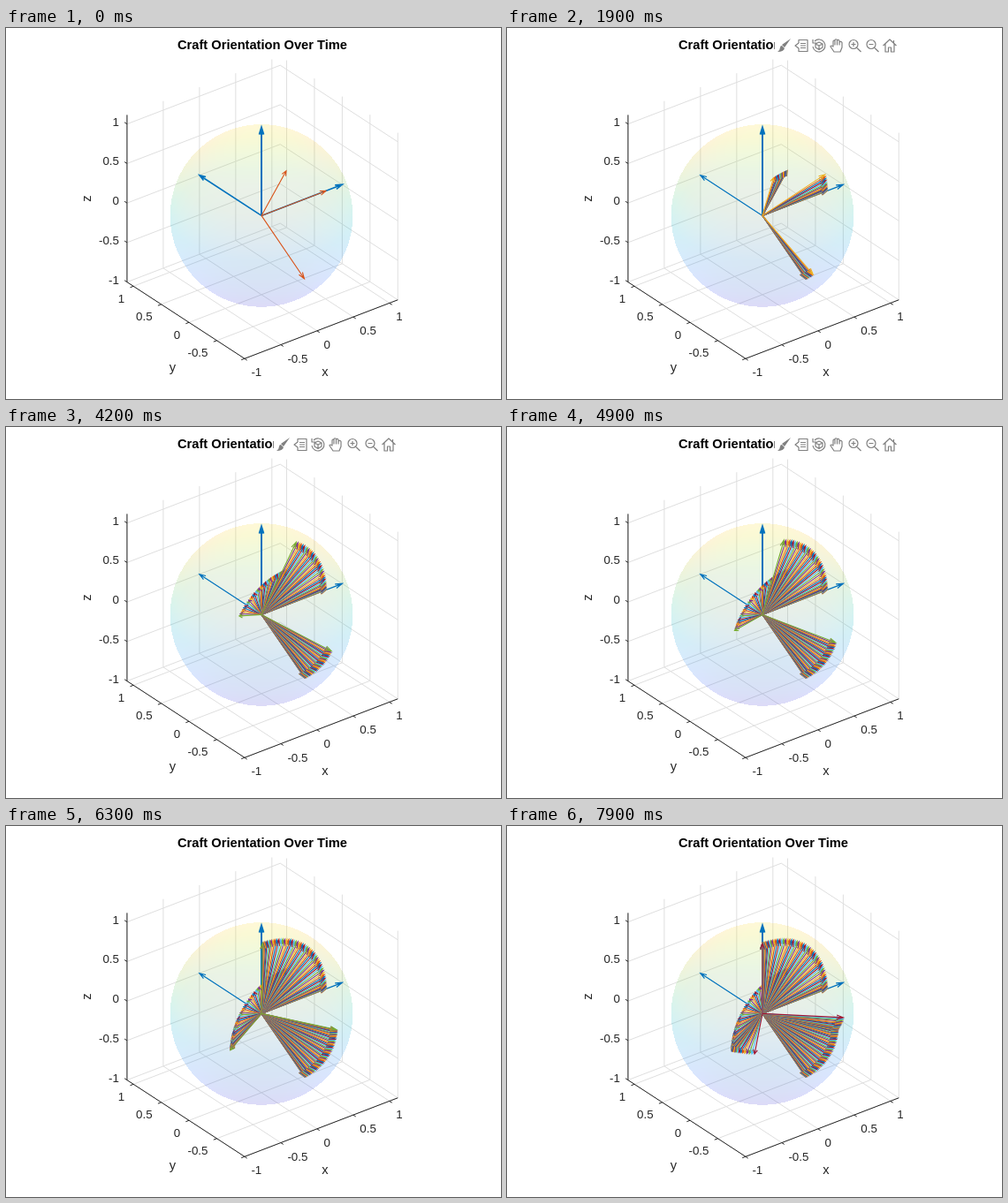
Animation of 560x420 px, one loop 8000 ms. Source, as an HTML page with a canvas:

```html
<!DOCTYPE html>
<html lang="en">
<head>
<meta charset="utf-8">
<title>Craft orientation</title>
<style>
  html, body { margin: 0; width: 100%; height: 100%; overflow: hidden; background: #fff; }
  canvas { display: block; }
</style>
</head>
<body>
<canvas id="stage" width="560" height="420"></canvas>
<script>
const W = 560, H = 420, LOOP = 8000;
const ctx = document.getElementById('stage').getContext('2d');
const FONT = '"Liberation Sans", Arial, sans-serif';
const ORIGIN = [289, 212.4], UNIT = 103.3;
const LOW = -1, HIGH = 1.115, BODY = 0.89;
const TICKS = [-1, -0.5, 0, 0.5, 1];
const COLORS = ['#0072bd', '#d95319', '#edb120', '#7e2f8e', '#77ac30', '#4dbeee', '#a2142f'];
const PARULA = [[62, 38, 168], [71, 82, 244], [46, 135, 247], [29, 167, 224], [18, 190, 185],
  [106, 204, 115], [200, 193, 41], [254, 195, 56], [249, 251, 21]];
const rad = d => d * Math.PI / 180;
const AZ = rad(37.5), EL = rad(30);

function project([x, y, z]) {
  const right = x * Math.cos(AZ) - y * Math.sin(AZ);
  const depth = x * Math.sin(AZ) + y * Math.cos(AZ);
  const up = depth * Math.sin(EL) + z * Math.cos(EL);
  return [ORIGIN[0] + UNIT * right, ORIGIN[1] - UNIT * up];
}

function line(c, ...points) {
  c.beginPath();
  points.forEach(p => c.lineTo(...project(p)));
  c.stroke();
}

function label(c, text, x, y, size, align = 'center', weight = '') {
  c.font = `${weight} ${size}px ${FONT}`;
  c.textAlign = align;
  c.fillText(text, x, y);
}

function layer(draw) {
  const c = document.createElement('canvas');
  c.width = W;
  c.height = H;
  draw(c.getContext('2d'));
  return c;
}

function parula(t) {
  const p = Math.max(0, Math.min(7.999, t * 8)), i = Math.floor(p);
  return PARULA[i].map((v, j) => v + (PARULA[i + 1][j] - v) * (p - i));
}

// Each pixel blends the far and the near shell, both 10 % opaque.
function paintSphere(c) {
  const img = c.createImageData(W, H);
  for (let y = 0; y < H; y++) for (let x = 0; x < W; x++) {
    const u = (x + 0.5 - ORIGIN[0]) / UNIT, v = (ORIGIN[1] - y - 0.5) / UNIT;
    const r2 = u * u + v * v;
    if (r2 > 1) continue;
    const d = Math.sqrt(1 - r2) * Math.sin(EL), h = v * Math.cos(EL);
    const near = parula((h + d + 1) / 2), far = parula((h - d + 1) / 2);
    const at = (y * W + x) * 4;
    for (let j = 0; j < 3; j++) img.data[at + j] = (near[j] * 0.1 + far[j] * 0.09) / 0.19;
    img.data[at + 3] = 0.19 * 255;
  }
  c.putImageData(img, 0, 0);
}

function paintAxes(c) {
  c.fillStyle = '#fff';
  c.fillRect(0, 0, W, H);
  c.lineWidth = 1;
  c.strokeStyle = '#dfdfdf';
  for (const t of TICKS) {
    line(c, [t, LOW, LOW], [t, HIGH, LOW], [t, HIGH, HIGH]);
    line(c, [LOW, t, LOW], [HIGH, t, LOW], [HIGH, t, HIGH]);
    line(c, [LOW, HIGH, t], [HIGH, HIGH, t], [HIGH, LOW, t]);
  }
  c.strokeStyle = c.fillStyle = '#262626';
  line(c, [LOW, HIGH, HIGH], [LOW, HIGH, LOW], [LOW, LOW, LOW], [HIGH, LOW, LOW]);
  const out = 0.045;
  for (const t of TICKS) {
    line(c, [t, LOW, LOW], [t, LOW - out, LOW]);
    line(c, [LOW, t, LOW], [LOW - out, t, LOW]);
    line(c, [LOW, HIGH, t], [LOW, HIGH + out, t]);
    const [xx, xy] = project([t, LOW, LOW]);
    const [yx, yy] = project([LOW, t, LOW]);
    const [zx, zy] = project([LOW, HIGH, t]);
    label(c, t, xx + 7.5, xy + 20, 13.33, 'left');
    if (t > LOW) label(c, t, yx - 10, yy + 18.5, 13.33, 'right');
    label(c, t, zx - 9, zy + 2, 13.33, 'right');
  }
  label(c, 'x', 361, 394, 14.67);
  label(c, 'y', 188.5, 389, 14.67);
  c.save();
  c.translate(96, 193);
  c.rotate(-Math.PI / 2);
  label(c, 'z', 0, 0, 14.67);
  c.restore();
  c.fillStyle = '#000';
  label(c, 'Craft Orientation Over Time', 290, 24, 14.67, 'center', 'bold');
}

function paintTools(c) {
  c.fillStyle = '#fff';
  c.fillRect(303, 10, 140, 20);
  c.strokeStyle = c.fillStyle = '#808080';
  c.lineWidth = 1.2;
  c.lineJoin = 'round';
  const icon = (x, stroke, fill = '') => {
    c.save();
    c.translate(x, 20);
    c.stroke(new Path2D(stroke));
    c.fill(new Path2D(fill));
    c.restore();
  };
  const lens = 'M4 -1.5A5 5 0 1 1 -6 -1.5A5 5 0 1 1 4 -1.5M2.6 2.2L7.5 7M-3.5 -1.5H1.5';
  icon(313, '', 'M8 -8L1 2L-2 -1ZM-2 0L1 3Q0 7 -7 7Q-4 5 -4 2Q-4 0 -2 0Z');
  icon(333, 'M-3 -6.5H7V6.5H-3V3L-7 0L-3 -3ZM-1 -2.5H5M-1 0H5M-1 2.5H5');
  icon(353, 'M-5 -5A7 7 0 1 1 -7 1M-7 -7V-3H-3M0 -4L4 -2V2L0 4.5L-4 2V-2ZM-4 -2L0 0L4 -2M0 0V4.5');
  icon(373, 'M-3 7L-7 1Q-7 -1 -4 1V-5Q-3 -7 -2 -5V-1V-6.5Q-1 -8 0.5 -6.5V-1V-6Q2 -7.5 3 -5.5V-1V-4Q5 -5.5 6 -3.5V2L4 7Z');
  icon(393, lens + 'M-1 -4V1');
  icon(413, lens);
  icon(433, 'M-7.5 0L0 -7L7.5 0M-5 -2V7H-1.5V2H1.5V7H5V-2M4.5 -6V-3');
}

function arrow(dir, scale, color, width) {
  const [x, y] = project(dir.map(v => v * scale));
  const dx = x - ORIGIN[0], dy = y - ORIGIN[1], len = Math.hypot(dx, dy) || 1;
  const ux = dx / len, uy = dy / len;
  const back = 2 + len * 0.06, side = 2.4;
  ctx.strokeStyle = color;
  ctx.lineWidth = width;
  ctx.beginPath();
  ctx.moveTo(...ORIGIN);
  ctx.lineTo(x, y);
  ctx.moveTo(x - ux * back - uy * side, y - uy * back + ux * side);
  ctx.lineTo(x, y);
  ctx.lineTo(x - ux * back + uy * side, y - uy * back - ux * side);
  ctx.stroke();
}

// Degrees turned after n steps: speed up, cruise, slow down to 90.
function slew(n) {
  const ramp = 15, speed = 1.88, end = ramp + 90 / speed;
  if (n <= 0) return 0;
  if (n >= end) return 90;
  if (n < ramp) return speed * n * n / (2 * ramp);
  if (n > end - ramp) return 90 - speed * (end - n) ** 2 / (2 * ramp);
  return speed * (n - ramp / 2);
}

function bodyAxes(step) {
  const pitch = rad(slew(step)), roll = rad(120 + slew(step - 58.5));
  const sp = Math.sin(pitch), cp = Math.cos(pitch);
  const sr = Math.sin(roll), cr = Math.cos(roll);
  return [[cp, 0, sp], [-sp * sr, cr, cp * sr], [-sp * cr, -sr, cp * cr]];
}

const axes = layer(paintAxes), sphere = layer(paintSphere), tools = layer(paintTools);

function draw(t) {
  const last = t < 500 ? 0 : Math.floor((t - 500) / 100) + 1;
  const thin = last ? 1.2 : 1.6;
  ctx.drawImage(axes, 0, 0);
  ctx.drawImage(sphere, 0, 0);
  arrow([1, 0, 0], HIGH, COLORS[0], thin);
  arrow([0, 1, 0], HIGH, COLORS[0], thin);
  arrow([0, 0, 1], HIGH, COLORS[0], 2);
  for (let k = 0; k <= last; k++) {
    for (const dir of bodyAxes(k)) arrow(dir, BODY, COLORS[(k + 1) % 7], 1.1);
  }
  if (t >= 500 && t < 5700) ctx.drawImage(tools, 0, 0);
}

const start = performance.now();
function tick() {
  draw((performance.now() - start) % LOOP);
  requestAnimationFrame(tick);
}
tick();
</script>
</body>
</html>
```
